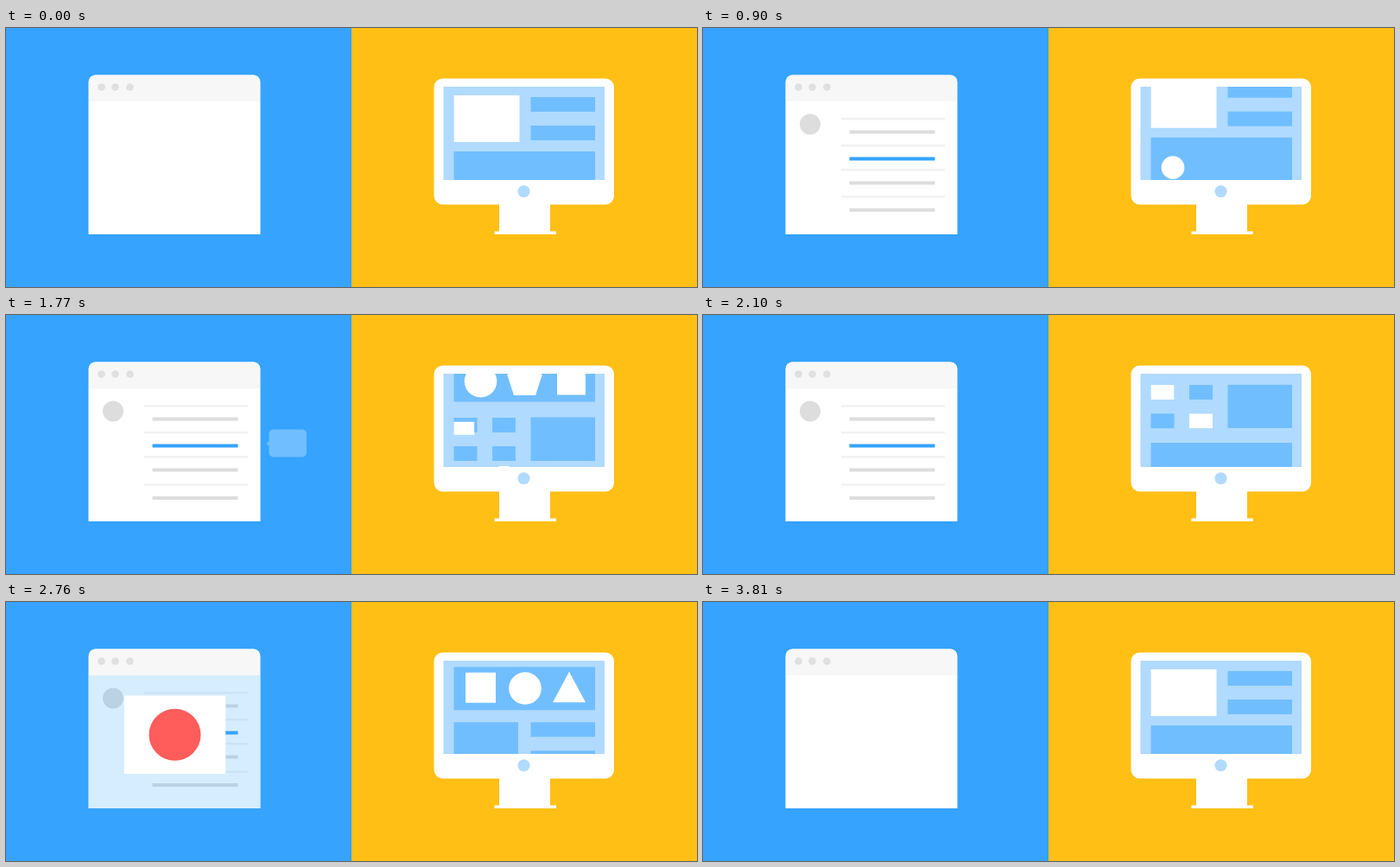
Write an HTML page with a canvas that moves like this. It is 800 px wide and 300 px high and loops after 4.52 s.

```html
<!DOCTYPE html>
<html lang="en">
<head>
<meta charset="utf-8">
<title>Browser and desktop</title>
<style>
  html, body { margin: 0; width: 100%; height: 100%; overflow: hidden; }
  canvas { display: block; width: 800px; height: 300px; }
</style>
</head>
<body>
<canvas width="800" height="300"></canvas>
<script>
const ctx = document.querySelector('canvas').getContext('2d');
const LOOP = 4520, PAGE = 263, TAU = Math.PI * 2;
const BLUE = '#35a3ff', YELLOW = '#ffbf14', PALE = '#b0daff', MID = '#71beff', GRAY = '#ddd';

const ramp = (t, start, length) => Math.min(1, Math.max(0, (t - start) / length));
const easeOut = u => 1 - (1 - u) ** 3;
const mix = (a, b, u) => a + (b - a) * u;

function box(color, left, top, right, bottom, radii = 0) {
  ctx.fillStyle = color;
  ctx.beginPath();
  ctx.roundRect(left, top, right - left, bottom - top, radii);
  ctx.fill();
}

function disc(color, x, y, r) {
  ctx.fillStyle = color;
  ctx.beginPath();
  ctx.arc(x, y, r, 0, TAU);
  ctx.fill();
}

function poly(color, ...points) {
  ctx.fillStyle = color;
  ctx.beginPath();
  points.forEach(p => ctx.lineTo(...p));
  ctx.fill();
}

// Runs draw with its own clip rectangle.
function clipped(left, top, right, bottom, draw) {
  ctx.save();
  ctx.beginPath();
  ctx.rect(left, top, right - left, bottom - top);
  ctx.clip();
  draw();
  ctx.restore();
}

// Grows a shape drawn around (0, 0) out of the point (dx, dy) beside its centre.
function pop(t, start, x, y, dx, dy, draw) {
  const k = easeOut(ramp(t, start, 180));
  if (!k) return;
  ctx.save();
  ctx.translate(x + dx * (1 - k), y + dy * (1 - k));
  ctx.scale(k, k);
  draw();
  ctx.restore();
}

function list(t) {
  pop(t, 165, 124, 111.5, 0, 0, () => disc(GRAY, 0, 0, 12));
  const hover = easeOut(ramp(t, 1185, 120)) * (1 - ramp(t, 1540, 150));
  [105, 136, 164, 196.5].forEach((rowY, i) => {
    const start = 480 + 90 * i;
    const y = rowY - 18 * (1 - easeOut(ramp(t, start, 260)));
    const grow = i === 1 ? hover : 0;
    const mid = y + 15.5 - 2.5 * grow, half = 2 + 2 * grow;
    ctx.globalAlpha = ramp(t, start, 110);
    box('#f2f2f2', 160, y - 1, 280, y + 1.5);
    box(i === 1 ? BLUE : GRAY, 169.5 - 5 * grow, mid - half, 268.5 + 5 * grow, mid + half);
  });
  ctx.globalAlpha = 1;
}

function modal(t) {
  ctx.globalAlpha = 0.2 * ramp(t, 2310, 90);
  box(BLUE, 96, 85, 294, 239);
  ctx.globalAlpha = 1;

  const open = easeOut(ramp(t, 2880, 180));
  const halfW = mix(58.7, 100, open), halfH = mix(45.2, 78, open);
  const y = mix(153.7, 162, open);
  pop(t, 2295, 195.5, y, 0, 60, () => box('#fff', -halfW, -halfH, halfW, halfH));

  ctx.globalAlpha = ramp(t, 2340, 270) * (1 - ramp(t, 2880, 150));
  pop(t, 2340, 195.5, y, 58, -11, () => disc('#ff5c5c', 0, 0, 30));
  ctx.globalAlpha = 1;
}

function tooltip(t) {
  ctx.globalAlpha = 1 - ramp(t, 1690, 115);
  pop(t, 1245, 301.5, 149, 0, 0, () => {
    box('#fff', 3, -16.5, 46.5, 15.5, 5);
    poly('#fff', [-0.5, 0], [3, -3], [3, 3]);
  });
  ctx.globalAlpha = 1;
}

function browser(t) {
  box('#fff', 95.5, 54.5, 294.5, 239, [8, 8, 0, 0]);
  box('#f7f7f7', 96, 54.5, 294, 85, [8, 8, 0, 0]);
  [110.5, 126.5, 143.5].forEach(x => disc('#e0e0e0', x, 68.5, 4.3));
  if (t < 3060) {
    clipped(95.5, 85, 294.5, 239, () => { list(t); modal(t); });
    tooltip(t);
  }
}

function pageTop(y) {
  box(MID, 518.5, y + 80, 593, y + 130);
  box(MID, 607.5, y + 80, 682, y + 97);
  box(MID, 607.5, y + 113, 682, y + 130);
  box(MID, 518.5, y + 143, 682, y + 193.5);
}

function page(t) {
  const square = half => () => box('#fff', -half, -half, half, half);
  const circle = () => disc('#fff', 0, 0, 18.8);
  const thumb = () => box('#fff', -13.5, -8.5, 13.5, 8.5);
  const hero = () => box('#fff', -38, -27, 38, 27);
  const pentagon = () => poly('#fff', ...[0, 1, 2, 3, 4].map(i =>
    [21.3 * Math.sin(i * TAU / 5), -21.3 * Math.cos(i * TAU / 5)]));
  const triangle = () => poly('#fff', [0, -17.7], [19, 17.7], [-19, 17.7]);

  pageTop(0);
  pageTop(PAGE);
  for (const y of [212, 245.2])
    for (const x of [518.5, 563]) box(MID, x, y, x + 27, y + 17);
  box(MID, 607.5, 211.7, 682, 262);
  box(MID, 518.5, 279, 682, 329);

  pop(t, -180, 556.5, 105, 0, 0, hero);
  pop(t, 840, 549.5, 169.8, -19, 28, circle);
  pop(t, 1215, 600.5, 168.8, 0, 32, pentagon);
  pop(t, 1260, 654.5, 169, 25, 38, square(16.5));
  pop(t, 1680, 532, 220.5, -14, 32, thumb);
  pop(t, 1740, 576.5, 253.7, 0, 32, thumb);
  pop(t, 2316, 652, 302.3, 25, 12, triangle);
  pop(t, 2376, 601, 303.8, 9, 35, circle);
  pop(t, 2436, 549.5, 303, -18, 32, square(17.5));
  pop(t, 3120, 556.5, 105 + PAGE, -13, 20, hero);
}

function desktop(t) {
  box('#fff', 495.5, 58.5, 704, 204.5, 10);
  box('#fff', 571, 204, 630, 236);
  box('#fff', 565.5, 235.5, 637, 239);
  disc(PALE, 599.5, 189.3, 7);
  box(PALE, 506.5, 68, 693, 176);
  const u = t < 3810 ? ramp(t, 335, 3540) : 1;
  const scroll = PAGE * (1 - Math.cos(Math.PI * u)) / 2;
  clipped(506.5, 68, 693, 176, () => {
    ctx.translate(0, -scroll);
    page(t);
  });
}

function frame() {
  const t = performance.now() % LOOP;
  box(BLUE, 0, 0, 400, 300);
  box(YELLOW, 400, 0, 800, 300);
  browser(t);
  desktop(t);
  requestAnimationFrame(frame);
}
frame();
</script>
</body>
</html>
```
